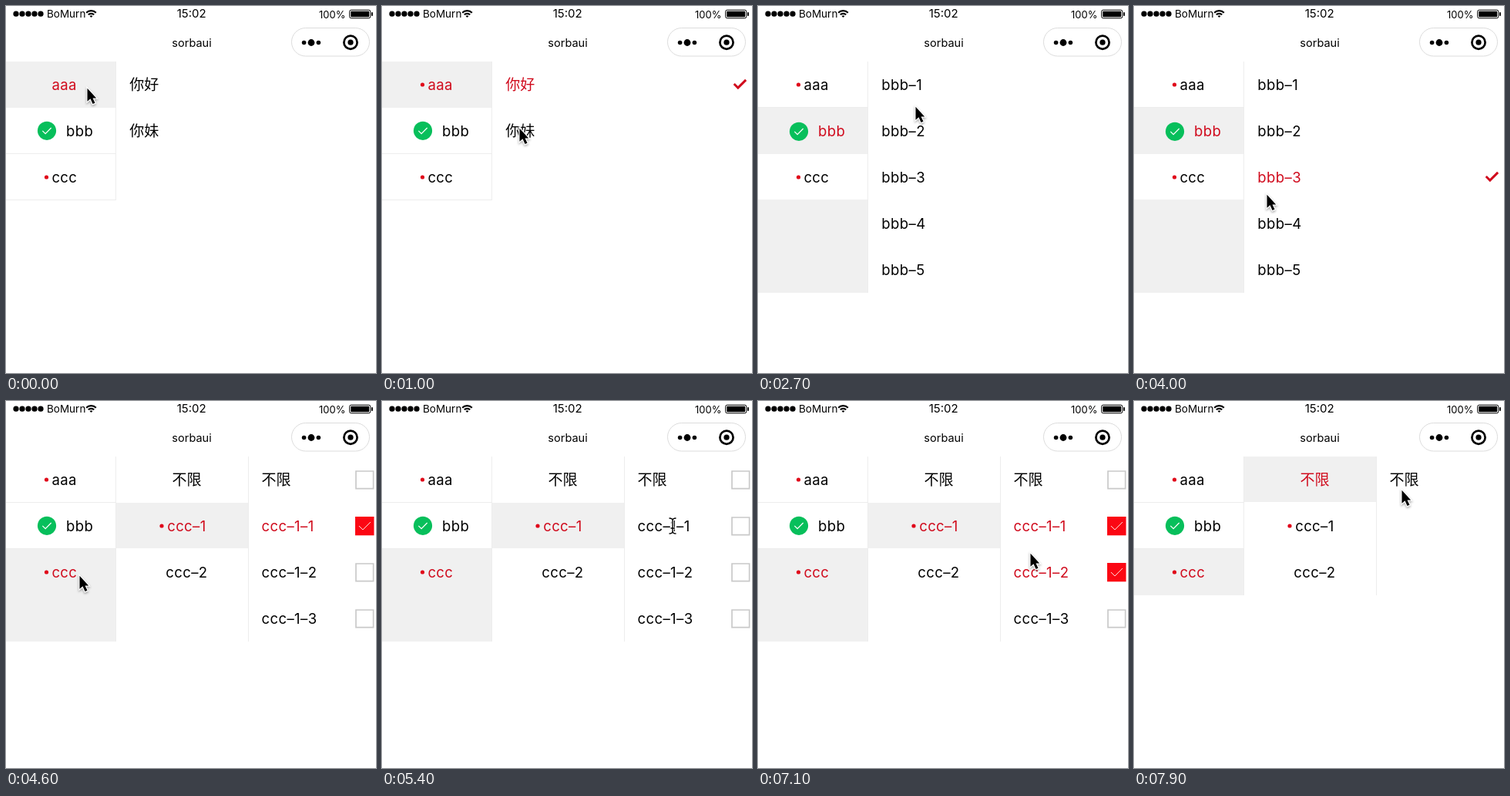
These frames come from a looping animation (480x476 px, 8 s). An HTML page with a canvas:

```html
<!DOCTYPE html>
<html lang="zh">
<head>
<meta charset="utf-8">
<title>Filter menu</title>
<style>
html, body { margin: 0; width: 100%; height: 100%; overflow: hidden; background: #fff; }
canvas { display: block; }
</style>
</head>
<body>
<canvas id="stage" width="480" height="476"></canvas>
<script>
const ctx = document.getElementById('stage').getContext('2d');
const LOOP = 8000, STEP = 100, GLIDE = 400;
const TOP = 72, ROW = 60;
const RED = '#d00a1c', BOX_RED = '#fb0713', GREEN = '#07bf5b', GREY = '#f0f0f0', LINE = '#ededed';
const LATIN = 'Inter, Roboto, sans-serif';
const HAN = '"Noto Sans CJK SC", "Noto Sans CJK", "Noto Sans CJK JP", sans-serif';
const ARROW = new Path2D('M.5 .8v17l4-3.5 3 6.8 3-1.3-3-6.3h4.7z');

const rowTop = row => TOP + row * ROW;
const rowMid = row => rowTop(row) + ROW / 2;

// Where the pointer comes to rest: arrival time, x, y
const stops = [
  [0, 105, 106], [400, 177, 111], [900, 178, 158], [1900, 133, 180],
  [2200, 98, 169], [2700, 204, 130], [2900, 190, 109], [3300, 182, 168],
  [3600, 172, 219], [4000, 172, 244], [4300, 95, 226], [5000, 377, 162],
  [6800, 354, 212], [7100, 353, 197], [7500, 235, 115], [7900, 347, 115]
];

// Rest at a stop, then glide so as to arrive at the next one on time
function pointer(t) {
  const next = stops.findIndex(s => s[0] > t);
  if (next < 0) return stops.at(-1).slice(1);
  const [t0, x0, y0] = stops[next - 1], [t1, x1, y1] = stops[next];
  const p = Math.max(0, 1 - (t1 - t) / Math.min(GLIDE, t1 - t0));
  const k = p * p * (3 - 2 * p);
  return [x0 + (x1 - x0) * k, y0 + (y1 - y0) * k];
}

function rect(x, y, w, h, color) {
  ctx.fillStyle = color;
  ctx.fillRect(x, y, w, h);
}

function disc(x, y, r, color = '#000') {
  ctx.fillStyle = color;
  ctx.beginPath();
  ctx.arc(x, y, r, 0, 7);
  ctx.fill();
}

function arc(x, y, r, from, to, width) {
  ctx.strokeStyle = '#000';
  ctx.lineWidth = width;
  ctx.beginPath();
  ctx.arc(x, y, r, from, to);
  ctx.stroke();
}

function outline(x, y, w, h, r, color, width) {
  ctx.strokeStyle = color;
  ctx.lineWidth = width;
  ctx.beginPath();
  ctx.roundRect(x, y, w, h, r);
  ctx.stroke();
}

function tick(x, y, size, color, width) {
  ctx.strokeStyle = color;
  ctx.lineWidth = width;
  ctx.beginPath();
  ctx.moveTo(x - size / 2, y);
  ctx.lineTo(x - size / 6, y + size / 3);
  ctx.lineTo(x + size / 2, y - size / 3);
  ctx.stroke();
}

function text(s, x, y, size, align = 'left', color = '#000', font = LATIN, spacing = 0) {
  ctx.font = `${size}px ${font}`;
  ctx.letterSpacing = spacing + 'px';
  ctx.fillStyle = color;
  ctx.textAlign = align;
  ctx.fillText(s, x, y);
}

function label(s, row, x, on, align) {
  const han = s > '\u3000';
  const style = han ? [HAN, 0] : [LATIN, 0.4];
  text(s, x, rowTop(row) + 37, han ? 19 : 18.5, align, on ? RED : '#000', ...style);
}

const mark = (row, x) => disc(x, rowMid(row), 2.6, '#e0061a');

function header() {
  for (let i = 0; i < 5; i++) disc(13 + i * 8, 10.2, 3.6);
  text('BoMurn', 53, 15, 13.5);
  for (let i = 0; i < 3; i++) arc(110.5, 15, 1.5 + i * 3.7, -2.36, -0.78, 2.2);
  text('15:02', 240.7, 15.2, 15, 'center');
  text('100%', 440.5, 16, 13, 'right');
  outline(445.7, 5.2, 27, 10.6, 2, '#000', 1);
  rect(447.3, 6.8, 23.8, 7.4, '#000');
  rect(474, 8.2, 1.8, 4.6, '#000');

  text('sorbaui', 241, 52.5, 14.5, 'center');
  outline(370.5, 28.5, 101, 36.5, 18.2, '#dcdcdc', 1);
  for (let i = -1; i < 2; i++) disc(396 + i * 9.4, 47.5, i ? 2.8 : 4.4);
  arc(447, 47.2, 8.6, 0, 7, 2.7);
  disc(447, 47.2, 3.6);
}

function leftColumn(active, dotted, bottom) {
  for (let i = 1; i < 4; i++) rect(0, rowTop(i) - 1, 142, 1, LINE);
  rect(0, rowTop(active), 142, ROW, GREY);
  if (bottom > rowTop(3)) rect(0, rowTop(3) - 1, 142, bottom - rowTop(3) + 1, GREY);
  rect(142, TOP, 1, bottom - TOP, LINE);

  ['aaa', 'bbb', 'ccc'].forEach((s, i) => label(s, i, i === 1 ? 78 : 59.4, i === active));
  if (dotted) mark(0, 52.5);
  mark(2, 52.5);

  const y = rowMid(1) + (active === 1 ? 0.8 : -0.2);
  disc(53, y, 12.1, GREEN);
  tick(53, y, 11.3, '#fff', 1.2);
}

function singleList(items, chosen) {
  items.forEach((s, i) => label(s, i, 160.3, i === chosen));
  if (chosen >= 0) tick(464.4, rowMid(chosen) - 1, 15.4, RED, 2.9);
}

function checkbox(row, on) {
  const y = rowMid(row) - 12;
  if (!on) return outline(454, y + 1, 22.6, 22.6, 0, '#c9c9c9', 1.7);
  rect(453, y, 24.5, 24.3, BOX_RED);
  tick(465.4, y + 12, 15, '#fff', 0.9);
}

function nestedList(active, checked, bottom) {
  rect(143, rowTop(active), 171, ROW - 1, GREY);
  rect(314, TOP, 1, bottom - TOP, LINE);
  ['不限', 'ccc–1', 'ccc–2'].forEach((s, i) => label(s, i, 234.4, i === active, 'center'));
  mark(1, 202);
  const items = active ? ['不限', 'ccc–1–1', 'ccc–1–2', 'ccc–1–3'] : ['不限'];
  items.forEach((s, i) => {
    label(s, i, 331.5, checked.includes(i));
    if (active) checkbox(i, checked.includes(i));
  });
}

function arrow(x, y) {
  ctx.save();
  ctx.translate(x, y);
  ctx.shadowColor = 'rgba(0,0,0,.35)';
  ctx.shadowBlur = 3;
  ctx.shadowOffsetY = 1.5;
  ctx.strokeStyle = '#fff';
  ctx.lineWidth = 2.4;
  ctx.stroke(ARROW);
  ctx.shadowColor = 'transparent';
  ctx.fillStyle = '#000';
  ctx.fill(ARROW);
  ctx.restore();
}

function beam(x, y) {
  ctx.beginPath();
  for (const sx of [-1, 1]) for (const sy of [-1, 1]) {
    ctx.moveTo(x + 4.5 * sx, y + 10 * sy);
    ctx.quadraticCurveTo(x, y + 10 * sy, x, y + 7 * sy);
    ctx.lineTo(x, y);
  }
  ctx.moveTo(x - 2.5, y + 3);
  ctx.lineTo(x + 2.5, y + 3);
  for (const [color, width] of [['#fff', 3.4], ['#000', 1.4]]) {
    ctx.strokeStyle = color;
    ctx.lineWidth = width;
    ctx.stroke();
  }
}

function draw(t) {
  rect(0, 0, 480, 476, '#fff');
  header();
  if (t < 2200) {
    leftColumn(0, t >= 500, rowTop(3));
    singleList(['你好', '你妹'], t < 500 ? -1 : t < 1200 ? 0 : 1);
  } else if (t < 4400) {
    leftColumn(1, true, rowTop(5));
    singleList([1, 2, 3, 4, 5].map(n => 'bbb–' + n), t < 3000 ? -1 : t < 3600 ? 0 : 2);
  } else {
    const active = t < 7700 ? 1 : 0, bottom = rowTop(3 + active);
    const checked = [];
    if (active && (t < 5300 || t >= 6200)) checked.push(1);
    if (active && t >= 6800) checked.push(2);
    leftColumn(2, true, bottom);
    nestedList(active, checked, bottom);
  }
  const overText = t >= 5000 && t < 6600;
  (overText ? beam : arrow)(...pointer(t));
}

function frame() {
  const t = performance.now() % LOOP;
  draw(Math.floor(t / STEP) * STEP);
  requestAnimationFrame(frame);
}
frame();
</script>
</body>
</html>
```
